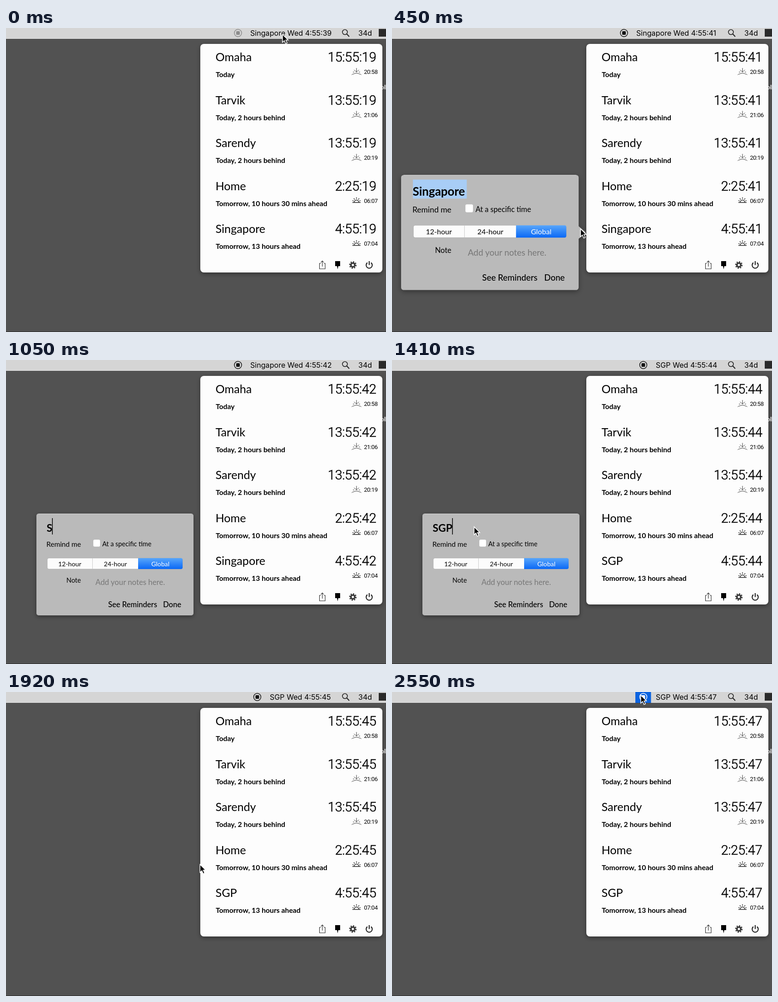
Animation, 837 px wide and 669 px high, one loop 2580 ms. Source, as an HTML page:

```html
<!DOCTYPE html>
<html lang="en">
<head>
<meta charset="utf-8">
<title>Menu bar clocks</title>
<style>
  html, body { margin: 0; width: 100%; height: 100%; overflow: hidden; background: #525252; }
  svg { display: block; width: 837px; height: 669px; }
  text { font-family: Lato, sans-serif; white-space: pre; }
  .menu { font: 16.1px Inter, sans-serif; fill: #000; }
  .name { font-size: 25.2px; }
  .time { font: 300 29px Roboto, sans-serif; letter-spacing: -.25px; text-anchor: end; stroke: #000; stroke-width: .5px; }
  .date { font-size: 15.75px; font-weight: 700; }
  .sun { font: 13px Roboto, sans-serif; letter-spacing: -.45px; text-anchor: end; }
  .title { font-size: 23px; font-weight: 700; }
  .seg { font-size: 14.2px; text-anchor: middle; }
  .btn { font-size: 16.6px; font-weight: 500; }
  .line { fill: none; stroke: #222; stroke-width: 1.1; }
</style>
</head>
<body>
<svg viewBox="0 0 837 669">
  <defs>
    <filter id="shadow" x="-20%" y="-20%" width="140%" height="140%">
      <feDropShadow dx="0" dy="3" stdDeviation="5" flood-opacity=".4"/>
    </filter>
    <linearGradient id="blue" x2="0" y2="1">
      <stop stop-color="#58a6fb"/><stop offset="1" stop-color="#0a68f6"/>
    </linearGradient>
    <g id="sunset" class="line">
      <path d="M-10.5 7Q-8.500 5 -6 5Q0 1.500 6 5Q8.500 5 10.500 7M0-8V1M-2.500-2L0 1L2.500-2M-5.500-4L-3.500-1.500M5.500-4L3.500-1.500M-8 1H-5M8 1H5" stroke-width=".9"/>
    </g>
    <g id="sunrise" class="line">
      <path d="M-9 4.5H9M-5 4A5 5 0 0 1 5 4M0-7V-3.5M-6-4.5L-4-2M6-4.5L4-2M-9 0L-6 1.5M9 0L6 1.5" stroke-width="1.3"/>
    </g>
  </defs>

  <rect width="837" height="669" fill="#525252"/>
  <rect y="668" width="837" height="1" fill="#2a2a2a"/>
  <text x="825" y="135" font-size="14" font-weight="700" fill="#fff">ol</text>

  <rect width="837" height="24" fill="#d5d5d5"/>
  <rect y="24" width="837" height="1" fill="#444"/>
  <rect id="hot" x="536" width="34.5" height="24" fill="#0b63e0"/>
  <g id="rec">
    <circle r="8" fill="none" stroke="currentColor" stroke-width="1.5"/>
    <rect x="-4" y="-4" width="8" height="8" rx="1.5" fill="currentColor"/>
  </g>
  <text id="clock" class="menu" y="17"></text>
  <g fill="none" stroke="#222" stroke-width="1.6">
    <circle cx="746.5" cy="9" r="5.5"/><path d="M750.5 13L756 19" stroke-width="2"/>
  </g>
  <text class="menu" x="776" y="17">34d</text>
  <rect x="821" y="2" width="16" height="17" fill="#2a2a2a"/>

  <g id="panel">
    <rect x="428" y="35" width="401" height="503" rx="8" fill="#fdfdfd" filter="url(#shadow)"/>
    <g id="rows"></g>
    <g id="dots" stroke="#000" stroke-width="1.3">
      <circle cx="445" cy="28" r="3"/><circle cx="445" cy="37" r="3"/><circle cx="445" cy="46" r="3"/>
    </g>
    <path class="line" d="M693.5 518H690.5V530H703V518H700M696.75 525V512.5M693.5 516L696.75 512.5L700 516"/>
    <path d="M725 513H736V524H732L730.5 531L729 524H725Z"/>
    <g fill="none" stroke="#3a3a3a">
      <circle cx="764" cy="521.5" r="4.3" stroke-width="3.6"/>
      <circle cx="764" cy="521.5" r="7" stroke-width="2.6" stroke-dasharray="2.75"/>
    </g>
    <path d="M796 516.5A6.7 6.7 0 1 0 804 516.5M800 513V521.5" fill="none" stroke="#222" stroke-width="2.2"/>
  </g>

  <g id="pop">
    <g filter="url(#shadow)" fill="#bababa">
      <path id="arrow" d="M412 437L427 450L412 463Z"/>
      <rect x="67" y="338" width="346" height="224" rx="5"/>
    </g>
    <path d="M72 338.5H408" stroke="#d6d6d6"/>
    <rect id="sel" x="90" y="347" width="105" height="37" fill="#a8cdf6"/>
    <text id="title" class="title" x="89.5" y="378"></text>
    <rect id="caret" y="348" width="1.5" height="36"/>
    <text x="89" y="411" font-size="15.5">Remind me</text>
    <rect x="192" y="395" width="15.5" height="16" rx="3" fill="#fff" stroke="#aaa" stroke-width=".5"/>
    <text x="212" y="410" font-size="14.4">At a specific time</text>
    <rect x="91" y="436" width="298" height="24" rx="3.5" fill="#fcfcfc" stroke="#999" stroke-width=".5"/>
    <path d="M190.5 436V460" stroke="#ccc"/>
    <path d="M291 436H385.5Q389 436 389 439.5V456.5Q389 460 385.5 460H291Z" fill="url(#blue)"/>
    <text class="seg" x="140.5" y="453.5">12-hour</text>
    <text class="seg" x="241" y="453.5">24-hour</text>
    <text class="seg" x="340" y="453.5" fill="#fff">Global</text>
    <text x="133" y="490" font-size="14.6">Note</text>
    <text x="197" y="495" font-size="16.8" fill="#777">Add your notes here.</text>
    <text class="btn" x="225" y="543.5">See Reminders</text>
    <text class="btn" x="346" y="543.5">Done</text>
  </g>

  <path id="pointer" d="M0 0V17.500L4.100 13.700L7 20.500L10.200 19.200L7.300 12.500H12.500Z" stroke="#fff" stroke-width="1.5"/>
  <path id="beam" d="M-4-9Q0-9 0-6Q0-9 4-9M0-6V7M-4 10Q0 10 0 7Q0 10 4 10M-2 3H2" fill="none" stroke="#111" stroke-width="1.3"/>
</svg>
<script>
const LOOP = 2580, STEP = 30, PITCH = 94.5;
const $ = id => document.getElementById(id);
const show = (id, on) => $(id).setAttribute('visibility', on ? 'visible' : 'hidden');
const move = (id, x, y) => $(id).setAttribute('transform', `translate(${x} ${y})`);

// label, day, hour and minute, sun event, its time
const places = [
  ['Omaha', 'Today', '15:55', 'sunset', '20:58'],
  ['Tarvik', 'Today, 2 hours behind', '13:55', 'sunset', '21:06'],
  ['Sarendy', 'Today, 2 hours behind', '13:55', 'sunset', '20:19'],
  ['Home', 'Tomorrow, 10 hours 30 mins ahead', '2:25', 'sunrise', '06:07'],
  ['Singapore', 'Tomorrow, 13 hours ahead', '4:55', 'sunrise', '07:04']
];
$('rows').innerHTML = places.map(([name, day, , sun, at], i) => `
  <g transform="translate(0 ${36 + i * PITCH})">
    <text class="name" x="461.5" y="37">${name}</text>
    <text class="time" x="815.5" y="38"></text>
    <text class="date" x="462" y="72">${day}</text>
    <use href="#${sun}" x="772" y="60"/>
    <text class="sun" x="818.5" y="65">${at}</text>
  </g>`).join('');
const times = document.querySelectorAll('.time');
const lastName = document.querySelectorAll('.name')[4];

// Each key: time, then values
const path = [
  [0, 609, 14], [60, 606, 24], [300, 443, 451], [420, 443, 451], [570, 177, 363],
  [1380, 177, 363], [1710, 341, 541], [1830, 352, 538], [2070, 590, 37],
  [2160, 590, 37], [2490, 548, 7]
];
const zoom = [[330, 0, 0], [360, .2, .2], [390, .67, .52], [420, 1.04, .85], [450, 1.13, 1], [510, 1.03, 1], [570, 1, 1]];

function sample(keys, t, ease = u => u) {
  const n = keys.findIndex(k => k[0] > t);
  if (n < 0) return keys[keys.length - 1].slice(1);
  if (n === 0) return keys[0].slice(1);
  const a = keys[n - 1], b = keys[n], u = ease((t - a[0]) / (b[0] - a[0]));
  return a.slice(1).map((v, i) => v + (b[i + 1] - v) * u);
}
const smooth = u => u * u * (3 - 2 * u);

function drawMenu(t, sec, renamed) {
  const active = t >= 2490;
  const clock = $('clock');
  clock.textContent = `${renamed ? 'SGP' : 'Singapore'} Wed 4:55:${sec}`;
  clock.setAttribute('x', renamed ? 581 : 538);
  move('rec', renamed ? 553.5 : 511, 11);
  $('rec').setAttribute('color', active ? '#fff' : t < 60 ? '#8c8c8c' : '#151515');
  show('hot', active);
}

function drawPanel(t, sec, renamed, x, y) {
  const shown = t < 60 ? 19 : sec;
  times.forEach((el, i) => el.textContent = `${places[i][2]}:${shown}`);
  lastName.textContent = renamed ? 'SGP' : 'Singapore';
  const row = Math.floor((y - 36) / PITCH);
  show('dots', x > 428 && x < 829 && row >= 0 && row < 5);
  move('dots', 0, 36 + row * PITCH);
  $('dots').setAttribute('fill', t >= 300 && t < 480 ? '#000' : '#fff');
}

function drawPopover(t) {
  const [scale, alpha] = sample(zoom, t);
  const fade = Math.min(1, Math.max(0, (1920 - t) / 90));
  const typed = t >= 1200 ? 3 : t >= 1110 ? 2 : t >= 990 ? 1 : 0;
  show('pop', scale > 0 && fade > 0);
  $('pop').setAttribute('opacity', alpha * fade);
  $('pop').setAttribute('transform', `translate(428 450) scale(${scale}) translate(-428 -450)`);
  $('arrow').setAttribute('opacity', t < 570 ? 1 : 0);
  $('title').textContent = typed ? 'SGP'.slice(0, typed) : 'Singapore';
  $('sel').setAttribute('opacity', typed ? 0 : 1);
  $('caret').setAttribute('opacity', typed ? 1 : 0);
  $('caret').setAttribute('x', [0, 101.5, 118, 132.5][typed]);
}

function draw(t) {
  const sec = 39 + Math.floor((t + 255) / 330);
  const renamed = t >= 1380;
  const [x, y] = sample(path, t, smooth);
  drawMenu(t, sec, renamed);
  drawPanel(t, sec, renamed, x, y);
  drawPopover(t);
  show('beam', t >= 540 && t < 990);
  show('pointer', t < 540 || t >= 1380);
  move('beam', x, y);
  move('pointer', x, y);
}

const start = performance.now();
function tick() {
  const t = (performance.now() - start) % LOOP;
  draw(Math.floor(t / STEP) * STEP);
  requestAnimationFrame(tick);
}
tick();
</script>
</body>
</html>
```
